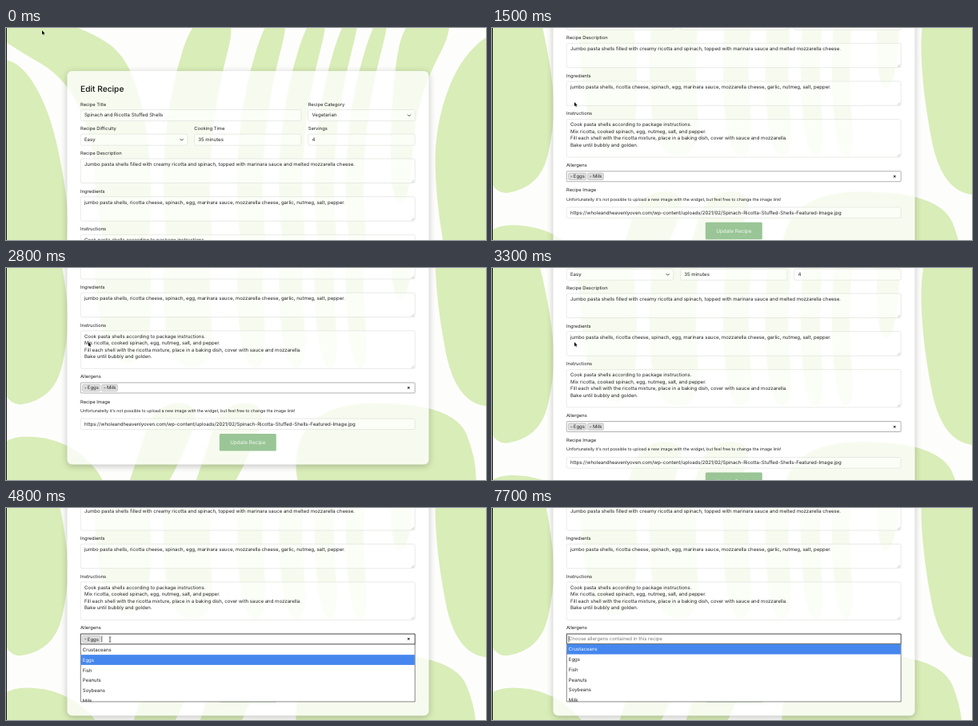
These frames come from a looping animation (600 by 266 pixels, 8 s). An HTML page with a canvas:

```html
<!DOCTYPE html>
<html lang="en">
<head>
<meta charset="utf-8">
<title>Edit Recipe</title>
<style>
html, body { margin: 0; width: 100%; height: 100%; overflow: hidden; background: #fff; }
canvas { display: block; width: 100vw; height: 100vh; }
</style>
</head>
<body>
<canvas id="stage"></canvas>
<script>
const W = 600, H = 266, LOOP = 8000, STEP = 100;
const canvas = document.getElementById('stage');
const ctx = canvas.getContext('2d');
const ratio = window.devicePixelRatio || 1;
canvas.width = W * ratio;
canvas.height = H * ratio;

const GREEN = '#d9edb8', INK = '#222', BLUE = '#4587ee';
const FIELD_TOP = 324.5, PITCH = 12.75, MENU_BOTTOM = 409.5;
const ALLERGENS = ['Crustaceans', 'Eggs', 'Fish', 'Peanuts', 'Soybeans', 'Milk'];

// time, scroll offset
const SCROLL = [[850, 0], [1100, 50], [1750, 204], [2650, 204],
  [3150, 126], [3300, 132], [3500, 166.5]];
// time, x, y of the pointer
const POINTER = [[400, 45, 3], [700, 103, 93], [3600, 103, 93], [4300, 123, 164],
  [4700, 123, 164], [4800, 130, 165], [5000, 130, 165], [5300, 108, 216],
  [5500, 108, 216], [5800, 214.5, 223.5], [6000, 214.5, 223.5], [6500, 502, 162]];

// curved patches of the page background, in page coordinates
const LEFT = [[-20, 36], [20, 44], [55, 105], [75, 200], [79, 265], [60, 345], [-20, 358]];
const SWEEP = [[-20, -10], [85, -10], [172, 50], [188, 300], [118, 300], [105, 80], [-20, 8]];
const RIGHT = [[640, -12], [572, 28], [536, 120], [537, 220], [562, 350], [640, 358]];
const CORNER = [[-20, 392], [70, 392], [132, 450], [110, 500], [-20, 500]];
const FLOOR = [[365, 350], [560, 350], [592, 430], [580, 500], [360, 500]];
// x at the top and width of the upright stripes
const STRIPES = [[263, 54], [342, 28], [393, 25], [435, 20], [473, 18]];

const stripe = ([x, w]) => [[x - w / 2, -20], [x + w / 2, -20], [x + w / 2 - 25, 75],
  [x + w / 2 - 38, 190], [x + w / 2 - 28, 305], [x - w / 2 - 32, 305],
  [x - w / 2 - 42, 190], [x - w / 2 - 30, 75]];
const ray = x => [[x, 350], [x + 62, 350], [x + 30, 430], [x - 12, 500], [x - 50, 500], [x - 22, 425]];

const PATCHES = [LEFT, SWEEP, RIGHT, CORNER, FLOOR, ...STRIPES.map(stripe),
  [[500, -20], [570, -20], [512, 90], [505, 220], [480, 220], [482, 70]],
  ...[185, 268].map(ray)];

function track(keys, t) {
  if (t <= keys[0][0]) return keys[0].slice(1);
  for (let i = 1; i < keys.length; i++) {
    const a = keys[i - 1], b = keys[i];
    if (t <= b[0]) {
      const p = (t - a[0]) / (b[0] - a[0]);
      return a.slice(1).map((v, k) => v + (b[k + 1] - v) * p);
    }
  }
  return keys[keys.length - 1].slice(1);
}

function patch(points) {
  const n = points.length;
  const mid = i => {
    const a = points[i % n], b = points[(i + 1) % n];
    return [(a[0] + b[0]) / 2, (a[1] + b[1]) / 2];
  };
  ctx.beginPath();
  ctx.moveTo(...mid(n - 1));
  points.forEach((p, i) => ctx.quadraticCurveTo(...p, ...mid(i)));
  ctx.fill();
}

function text(str, x, y, size = 6.07, color = INK, weight = 400, align = 'left') {
  ctx.font = `${weight} ${size}px Inter, "Open Sans", sans-serif`;
  ctx.fillStyle = color;
  ctx.textAlign = align;
  ctx.textBaseline = 'alphabetic';
  ctx.fillText(str, x, y + size * 0.34);
}

function box(x, y, w, h, r, fill, stroke, line = 0.6) {
  ctx.beginPath();
  ctx.roundRect(x, y, w, h, r);
  if (fill) { ctx.fillStyle = fill; ctx.fill(); }
  if (stroke) { ctx.strokeStyle = stroke; ctx.lineWidth = line; ctx.stroke(); }
}

function path(points, color, width) {
  ctx.beginPath();
  points.forEach(p => ctx.lineTo(...p));
  ctx.strokeStyle = color;
  ctx.lineWidth = width;
  ctx.stroke();
}

const label = (str, x, y) => text(str, x, y, 5.8, '#1c1c1c');

function input(x, y, w, h, lines) {
  box(x, y, w, h, 2, 'rgba(255,255,255,.55)', '#d9ddd5');
  lines.forEach((s, i) => text(s, x + 4.7, y + 6.8 + i * 8.5));
}

function select(x, y, w, value) {
  input(x, y, w, 14, [value]);
  const cx = x + w - 7.2, cy = y + 7;
  path([[cx - 2, cy - 1], [cx, cy + 1], [cx + 2, cy - 1]], '#333', 0.9);
}

function area(y, h, lines) {
  input(93.2, y, 418, h, lines);
  for (const d of [1, 3]) path([[510 - d, y + h - 0.8], [510, y + h - 0.8 - d]], '#888', 0.5);
}

function tags(names) {
  let x = 95.6;
  for (const name of names) {
    ctx.font = '400 6px Inter, "Open Sans", sans-serif';
    const w = ctx.measureText(name).width + 8;
    box(x, FIELD_TOP + 2.3, w, 8.4, 1.2, '#e2e2e2', '#aaa');
    text('×', x + 1.8, FIELD_TOP + 6.5, 5.4, '#888', 600);
    text(name, x + 6.2, FIELD_TOP + 6.5, 6);
    x += w + 2;
  }
  return x;
}

function allergenField(t) {
  const open = t >= 4500 && t < 5400 || t >= 6700;
  const cleared = t >= 6700;
  const focused = t >= 4500;
  const names = t < 4500 ? ['Eggs', 'Milk'] : t < 5400 ? ['Eggs'] : cleared ? [] : ['Eggs', 'Peanuts'];
  const h = cleared ? 12.4 : 13;
  box(93.3, FIELD_TOP, 417.9, h, open ? 0 : 1, 'rgba(255,255,255,.9)',
    focused ? '#333' : '#909090', focused ? 0.9 : 0.7);
  let caret = tags(names);
  if (cleared) {
    text('Choose allergens contained in this recipe', 95.8, FIELD_TOP + 6.1, 6, '#777');
    caret = 96;
  } else {
    text('×', 503.2, FIELD_TOP + 6.1, 6, '#111', 700, 'center');
  }
  const since = t - (cleared ? 6700 : t < 5400 ? 4500 : 5400);
  if (focused && since % 1000 < 500) {
    path([[caret, FIELD_TOP + 2.4], [caret, FIELD_TOP + 10.4]], '#222', 0.7);
  }
  return { open, names, menuTop: FIELD_TOP + h };
}

function menu(top, names, active) {
  ctx.save();
  box(93.3, top, 417.9, MENU_BOTTOM - top, 0, '#fff', '#555', 0.7);
  ctx.clip();
  ALLERGENS.forEach((name, i) => {
    const y = top + 0.4 + i * PITCH, on = i === active;
    if (on || names.includes(name)) {
      ctx.fillStyle = on ? BLUE : '#ddd';
      ctx.fillRect(93.6, y, 417.3, PITCH);
    }
    text(name, 95.8, y + PITCH / 2 + 0.2, 6.03, on ? '#fff' : INK);
  });
  ctx.restore();
}

function form() {
  ctx.save();
  ctx.shadowColor = 'rgba(0,0,0,.24)';
  ctx.shadowBlur = 9 * ratio;
  ctx.shadowOffsetY = 2 * ratio;
  box(76.5, 54, 452, 373, 6, '#fff');
  ctx.restore();

  // the pattern shows faintly through the card
  ctx.save();
  ctx.beginPath();
  ctx.roundRect(76.5, 54, 452, 373, 6);
  ctx.clip();
  ctx.globalAlpha = 0.22;
  ctx.fillStyle = GREEN;
  PATCHES.forEach(patch);
  ctx.restore();

  text('Edit Recipe', 93, 76.5, 10.2, '#111', 500);
  label('Recipe Title', 93, 95.7);
  label('Recipe Category', 377.7, 95.7);
  input(93.2, 102.6, 275.8, 14, ['Spinach and Ricotta Stuffed Shells']);
  select(377.8, 102.6, 133.4, 'Vegetarian');
  label('Recipe Difficulty', 93, 126.2);
  label('Cooking Time', 235.3, 126.2);
  label('Servings', 377.7, 126.2);
  select(93.2, 133.2, 133.6, 'Easy');
  input(235.5, 133.2, 133.5, 14, ['35 minutes']);
  input(377.8, 133.2, 133.4, 14, ['4']);
  label('Recipe Description', 93, 157);
  area(164, 30.5, ['Jumbo pasta shells filled with creamy ricotta and spinach, topped with marinara sauce and melted mozzarella cheese.']);
  label('Ingredients', 93, 204.6);
  area(211.7, 30.5, ['jumbo pasta shells, ricotta cheese, spinach, egg, marinara sauce, mozzarella cheese, garlic, nutmeg, salt, pepper.']);
  label('Instructions', 93, 252.2);
  area(259.4, 47.5, [
    'Cook pasta shells according to package instructions.',
    'Mix ricotta, cooked spinach, egg, nutmeg, salt, and pepper.',
    'Fill each shell with the ricotta mixture, place in a baking dish, cover with sauce and mozzarella.',
    'Bake until bubbly and golden.'
  ]);
  label('Allergens', 93, 317);
  label('Recipe Image', 93, 348.2);
  text("Unfortunatelly it's not possible to upload a new image with the widget, but feel free to change the image link!", 93, 359.7, 5.24);
  input(93.2, 369.6, 418, 13.6, ['https://wholeandheavenlyoven.com/wp-content/uploads/2021/02/Spinach-Ricotta-Stuffed-Shells-Featured-Image.jpg']);
  box(266.8, 388.6, 71, 21.4, 1.5, '#9ac596');
  text('Update Recipe', 302.3, 399.4, 6.4, '#f4faf2', 400, 'center');
}

function arrow(x, y) {
  ctx.beginPath();
  [[0, 0], [0, 5.2], [1.2, 4.1], [2, 6], [2.9, 5.6], [2.1, 3.8], [3.7, 3.7]]
    .forEach(([dx, dy]) => ctx.lineTo(x + dx, y + dy));
  ctx.closePath();
  ctx.strokeStyle = '#fff';
  ctx.lineWidth = 0.8;
  ctx.stroke();
  ctx.fillStyle = '#000';
  ctx.fill();
}

function beam(x, y) {
  path([[x, y - 2.7], [x, y + 2.7]], '#111', 0.7);
  for (const dy of [-3, 3]) path([[x - 1.3, y + dy], [x + 1.3, y + dy]], '#111', 0.6);
}

function draw(t) {
  const [scroll] = track(SCROLL, t);
  const [px, py] = track(POINTER, t);
  ctx.setTransform(ratio, 0, 0, ratio, 0, 0);
  ctx.textRendering = 'geometricPrecision';
  ctx.fillStyle = '#fdfefc';
  ctx.fillRect(0, 0, W, H);

  ctx.save();
  ctx.translate(0, -scroll);
  ctx.fillStyle = GREEN;
  PATCHES.forEach(patch);
  form();
  const { open, names, menuTop } = allergenField(t);
  if (open) {
    const hovered = Math.floor((py + scroll - menuTop) / PITCH);
    menu(menuTop, names, t >= 6700 ? 0 : hovered >= 0 ? hovered : 1);
  }
  ctx.restore();

  ctx.fillStyle = '#111';
  ctx.fillRect(0, 0, 1, H);

  if (t < 6800) {
    const typing = open && t >= 4800 && t < 5400 && py < menuTop - scroll;
    (typing ? beam : arrow)(px, py);
  }
}

const start = performance.now();
function tick(now) {
  const t = Math.max(0, now - start) % LOOP;
  draw(Math.floor(t / STEP) * STEP);
  requestAnimationFrame(tick);
}
draw(0);
requestAnimationFrame(tick);
</script>
</body>
</html>
```
